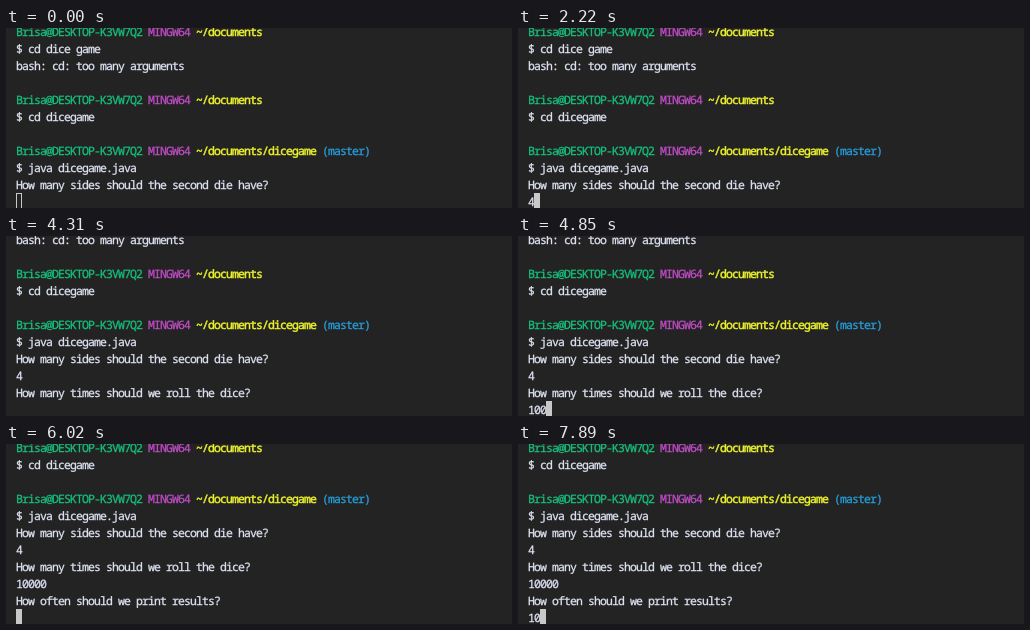
These frames come from a looping animation (506x180 px, 8 s). An HTML page:

```html
<!DOCTYPE html>
<html lang="en">
<head>
<meta charset="utf-8">
<style>
  html, body { margin: 0; width: 506px; height: 180px; overflow: hidden; background: #232323; }
  body { position: relative; }
  pre {
    position: absolute; left: 10px; top: -4px; margin: 0; color: #dde2f2;
    font: 500 11.5px/17px "Noto Sans Mono", "DejaVu Sans Mono", monospace;
    letter-spacing: -.9px; text-rendering: geometricPrecision;
    font-variant-ligatures: none; -webkit-text-stroke: .3px;
  }
  .user { color: #16c07c; }
  .sys { color: #c04cc6; }
  .path { color: #eaf02c; -webkit-text-stroke: .5px; }
  .branch { color: #249fdc; }
  #cursor {
    position: absolute; top: 165px; width: 6px; height: 17px;
    box-sizing: border-box; border: 1px solid #c8c8c8;
  }
  #pointer { position: absolute; left: 481px; top: 165px; }
</style>
</head>
<body>
<pre id="screen"></pre>
<div id="cursor"></div>
<svg id="pointer" width="7" height="15"><path d="M0 .5H3M4 .5H7M3.5 1V15" stroke="#ddd" fill="none"/></svg>
<script>
const LOOP = 8000, ROWS = 11, CELL = 6;
const $ = id => document.getElementById(id);
const span = (name, text) => `<span class="${name}">${text}</span>`;
const prompt = (dir, branch = '') => [
  span('user', 'Brisa@DESKTOP-K3VW7Q2'), span('sys', 'MINGW64'),
  span('path', '~/documents' + dir), span('branch', branch)
].join(' ');

const history = [
  prompt(''), '$ cd dice game', 'bash: cd: too many arguments', '',
  prompt(''), '$ cd dicegame', '',
  prompt('/dicegame', '(master)'), '$ java dicegame.java',
  'How many sides should the second die have?'
];
const questions = ['How many times should we roll the dice?', 'How often should we print results?'];

// Cursor states and key presses; a key press also shows the cursor.
const steps = [
  [0, 'hollow'], [830, 'on'], [1450, 'off'], [2000, 'on'], [2220, '4'], [2520, 'enter'],
  [3170, 'off'], [3690, 'on'], [4310, 'off'],
  [4480, '1'], [4700, '0'], [4850, '0'], [5100, '0'], [5250, '0'], [5870, 'off'], [6020, 'enter'],
  [6570, 'off'], [7190, 'on'], [7660, '1'], [7890, '0']
];

function stateAt(time) {
  const lines = [...history];
  let input = '', cursor = 'on', asked = 0;
  for (const [start, action] of steps) {
    if (start > time) break;
    cursor = 'on';
    if (action === 'enter') {
      lines.push(input, questions[asked++]);
      input = '';
    } else if (action.length === 1) input += action;
    else cursor = action;
  }
  return { lines: [...lines, input].slice(-ROWS), column: input.length, cursor };
}

let shown = '';
function draw(now) {
  const time = now % LOOP;
  const { lines, column, cursor } = stateAt(time);
  const html = lines.join('\n');
  if (html !== shown) $('screen').innerHTML = shown = html;
  const style = $('cursor').style;
  style.left = 10 + column * CELL + 'px';
  style.background = cursor === 'on' ? '#c8c8c8' : 'none';
  style.visibility = cursor === 'off' ? 'hidden' : 'visible';
  $('pointer').style.visibility = time >= 200 && time < 280 ? 'visible' : 'hidden';
}

function frame() {
  draw(performance.now());
  requestAnimationFrame(frame);
}
frame();
</script>
</body>
</html>
```
